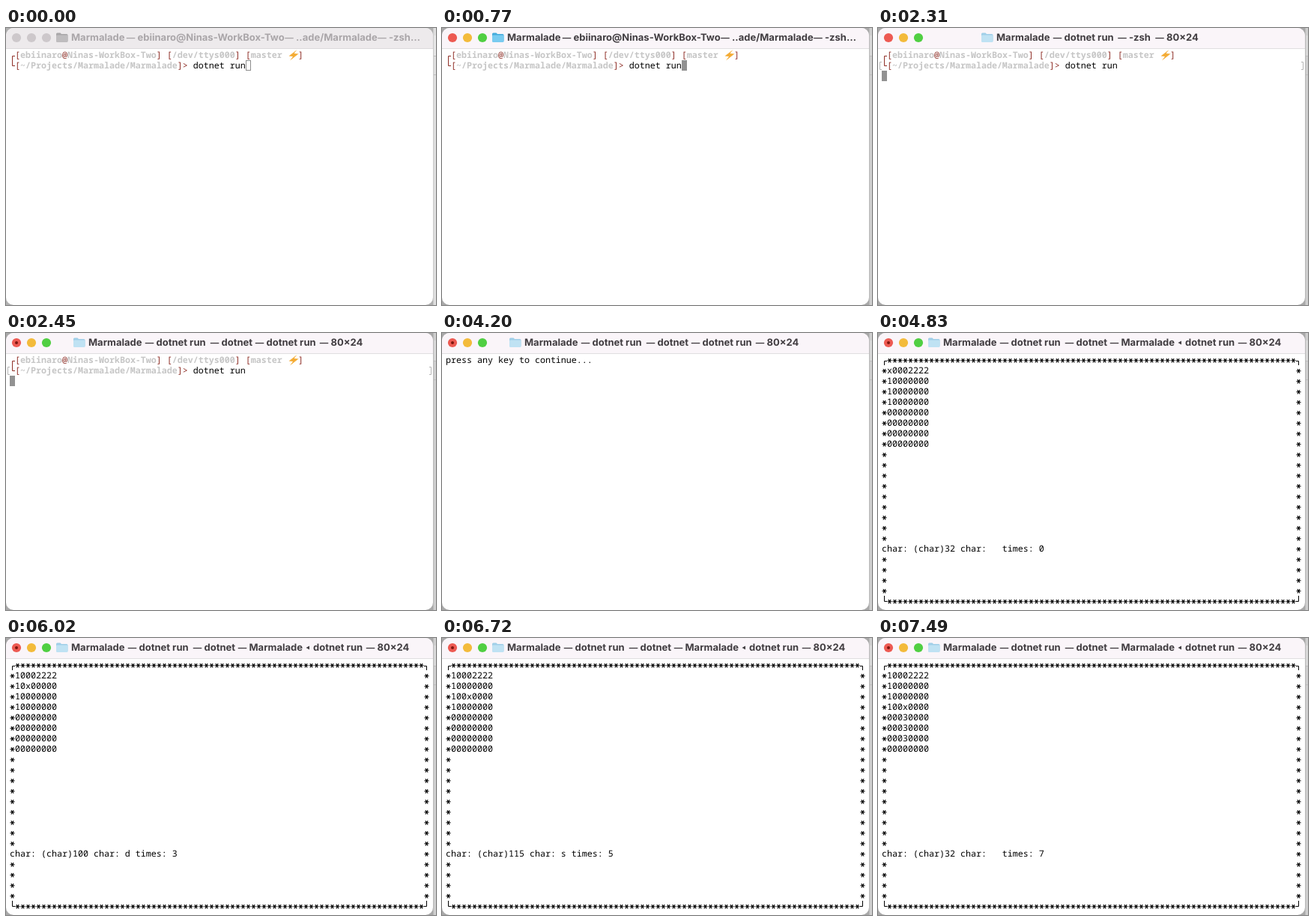
These frames come from a looping animation (574 px wide and 370 px high, 8000 ms). An HTML page:

```html
<!DOCTYPE html>
<html lang="en">
<head>
<meta charset="utf-8">
<title>Terminal session</title>
<style>
html, body { margin: 0; width: 100%; height: 100%; overflow: hidden; background: #fff; }
svg { display: block; width: 574px; height: 370px; }
text { white-space: pre; text-rendering: geometricPrecision; }
.mono { font: 500 11.667px "Noto Sans Mono", "DejaVu Sans Mono", monospace; fill: #000; }
.title { font: 700 13px Inter, "Open Sans", sans-serif; }
.dash { font-size: 11.5px; text-anchor: middle; }
.red { fill: #8f2f27; }
.dim { fill: #c6c6c6; font-weight: 700; }
</style>
</head>
<body>
<svg viewBox="0 0 574 370">
  <g id="back"></g>
  <path d="M0 10A10 10 0 0 1 10 0H560A10 10 0 0 1 570 10V360A10 10 0 0 1 560 370H10A10 10 0 0 1 0 360Z" fill="#fff"/>
  <g id="bar"></g>
  <g id="screen"></g>
</svg>
<script>
const LOOP = 8000, CELL = 7, LINE = 14, LEFT = 5;
const USER = "ebiinaro", HOST = "Ninas-WorkBox-Two";
const $ = id => document.getElementById(id);
const colX = c => LEFT + c * CELL;
const rowY = r => 40 + r * LINE;

const rect = (x, y, w, h, fill, more = "") =>
  `<rect x="${x}" y="${y}" width="${w}" height="${h}" fill="${fill}" ${more}/>`;
const mono = (col, row, s, cls = "") =>
  `<text class="mono ${cls}" x="${colX(col)}" y="${rowY(row)}">${s}</text>`;
const stroke = (d, color, width = 1) =>
  `<path d="${d}" fill="none" stroke="${color}" stroke-width="${width}"/>`;
// Six-armed border star, centred in its cell.
const star = (col, row) =>
  `M${colX(col) + 0.4} ${rowY(row) - 3.2}h6.2m-4.7 -2.7l3.2 5.4m0 -5.4l-3.2 5.4`;

// Window titles: icon x, then [text, x] parts joined by dashes; `arrow` marks the part led by a triangle.
const TITLES = {
  shell: { icon: 67, parts: [["Marmalade", 87], [`${USER}@${HOST}`, 175.5], ["..ade/Marmalade", 387], ["-zsh…", 511]] },
  start: { icon: 138, parts: [["Marmalade", 158], ["dotnet run", 248.5], ["-zsh", 335], ["80×24", 385]] },
  run: { icon: 90, parts: [["Marmalade", 110], ["dotnet run", 200.5], ["dotnet", 287.5], ["dotnet run", 347.5], ["80×24", 433.5]] },
  game: { icon: 67, arrow: 4, parts: [["Marmalade", 87], ["dotnet run", 177.5], ["dotnet", 264.5], ["Marmalade", 324.5], ["dotnet run", 410], ["80×24", 495.5]] }
};

function folder(x, active, pale) {
  const [tab, body] = !active ? ["#a9a7a9", "#bebcbe"] : pale ? ["#a0cfe8", "#bfe2f3"] : ["#45abdc", "#79cbf0"];
  return `<path d="M${x} 17.5V8Q${x} 6.5 ${x + 1.5} 6.5H${x + 5.5}L${x + 7} 8H${x + 14}Q${x + 15.5} 8 ${x + 15.5} 9.5V17.5Z" fill="${tab}"/>` +
    rect(x, 9.5, 15.5, 9.5, body, 'rx="1.3"');
}

function lights(active, busy) {
  const fills = active ? ["#ed5a52", "#f3bb3b", "#50cf42"] : ["#cdc8cb", "#cdc8cb", "#cdc8cb"];
  return fills.map((f, i) => `<circle cx="${14 + 20 * i}" cy="13" r="6.1" fill="${f}"/>`).join("") +
    (busy ? '<circle cx="14" cy="13" r="2" fill="#7d160f"/>' : "");
}

function titleBar({ title, active, busy, pale }) {
  const { icon, parts, arrow } = TITLES[title];
  const ink = active ? "#413d41" : "#aaa6a9";
  const word = (s, x, cls = "") => `<text class="title ${cls}" x="${x}" y="17.4" fill="${ink}">${s}</text>`;
  const joint = (x, i) => i === arrow
    ? `<path d="M${x - 9.5} 13L${x - 5} 10.5V15.5Z" fill="${ink}"/>`
    : word("—", x - 9, "dash");
  return `<path d="M0 27V10A10 10 0 0 1 10 0H560A10 10 0 0 1 570 10V27Z" fill="${active ? "#faf5f9" : "#edeaec"}"/>` +
    rect(0, 27, 570, 1, active ? "#e0dee0" : "#dbd9db") +
    lights(active, busy) + folder(icon, active, pale) +
    parts.map(([s, x], i) => (i ? joint(x, i) : "") + word(s, x)).join("");
}

function backdrop(active) {
  return rect(0, 0, 574, 370, active ? "#a8a8a8" : "#b0b0b0") +
    rect(570, 0, 4, 370, active ? "#cecece" : "#dedede") +
    rect(571, 10, 3, 27, active ? "#d8d8d8" : "#e6e6e6") +
    rect(571, 37, 3, 1, "#bdbdbd") + rect(571, 62, 3, 1, "#bdbdbd") +
    rect(570, 0, 1, 370, active ? "#b9b9b9" : "#cacaca");
}

function prompt() {
  const red = s => `<tspan class="red">${s}</tspan>`;
  const dim = s => `<tspan class="dim">${s}</tspan>`;
  return stroke("M12 37.5H8.5V50.5H12", "#8f2f27") +
    mono(1, 0, red("[") + dim(USER) + red("@") + dim(HOST) + red("] [") + dim("/dev/ttys000") + red("] [") + dim("master")) +
    '<path d="M388.5 29L377.5 37.5L383 38L379 43.5L390.5 34.5L384.5 34Z" fill="#f4ac35"/>' +
    mono(55, 0, "]", "red") +
    mono(1, 1, red("[") + dim("~/Projects/Marmalade/Marmalade") + red("]&gt;") + " dotnet run");
}

const hollow = rect(320.5, 43.5, 6, 13, "none", 'stroke="#8e8e8e"');
const solid = (col, row) => rect(colX(col), 29 + row * LINE, CELL, LINE, "#929292");
const marks = stroke("M5 45.5H2.5V55.5H5M565 45.5H567.5V55.5H565", "#b5b5b5");
const pressKey = () => mono(0, 0, "press any key to continue...");

function frame() {
  let stars = "";
  for (let c = 1; c < 79; c++) stars += star(c, 0) + star(c, 23);
  for (let r = 1; r < 23; r++) stars += (r === 18 ? "" : star(0, r)) + star(79, r);
  return stroke("M12 37.5H8.5V43M558 37.5H561.5V43M8.5 351V358.5H12M561.5 351V358.5H558", "#000") +
    stroke(stars, "#000", 1.1);
}

// Key presses: s moves down, d moves right, space fills the cells below.
const KEYS = [[5530, "s"], [5810, "d"], [6020, "d"], [6510, "d"], [6720, "s"], [6930, "s"], [7490, " "]];

function board(count) {
  const grid = Array.from({ length: 8 }, (_, r) =>
    [...(r === 0 ? "10002222" : r < 4 ? "10000000" : "00000000")]);
  let x = 0, y = 0, key = " ";
  for (const [, k] of KEYS.slice(0, count)) {
    key = k;
    if (k === "s") y++;
    else if (k === "d") x++;
    else for (let i = 1; i <= 3; i++) grid[y + i][x] = "3";
  }
  grid[y][x] = "x";
  return frame() + grid.map((line, r) => mono(1, r + 1, line.join(""))).join("") +
    mono(0, 18, `char: (char)${key.charCodeAt(0)} char: ${key} times: ${count}`);
}

const SCENES = [
  { at: 0, title: "shell", draw: () => prompt() + hollow },
  { at: 700, title: "shell", active: true, draw: () => prompt() + solid(45, 1) },
  { at: 2310, title: "start", active: true, pale: true, draw: () => prompt() + marks + solid(0, 2) },
  { at: 2450, title: "run", active: true, pale: true, busy: true, draw: () => prompt() + marks + solid(0, 2) },
  { at: 4200, title: "run", active: true, pale: true, busy: true, draw: pressKey },
  { at: 4270, title: "game", active: true, pale: true, busy: true, draw: pressKey },
  ...[4830, ...KEYS.map(k => k[0])].map((at, i) =>
    ({ at, title: "game", active: true, pale: true, busy: true, draw: () => board(i) }))
];

let shown = null;
function render(t) {
  const scene = SCENES.filter(s => s.at <= t).pop();
  if (scene === shown) return;
  shown = scene;
  $("back").innerHTML = backdrop(scene.active);
  $("bar").innerHTML = titleBar(scene);
  $("screen").innerHTML = scene.draw();
}

const start = performance.now();
function tick() {
  render((performance.now() - start) % LOOP);
  requestAnimationFrame(tick);
}
render(0);
requestAnimationFrame(tick);
</script>
</body>
</html>
```
